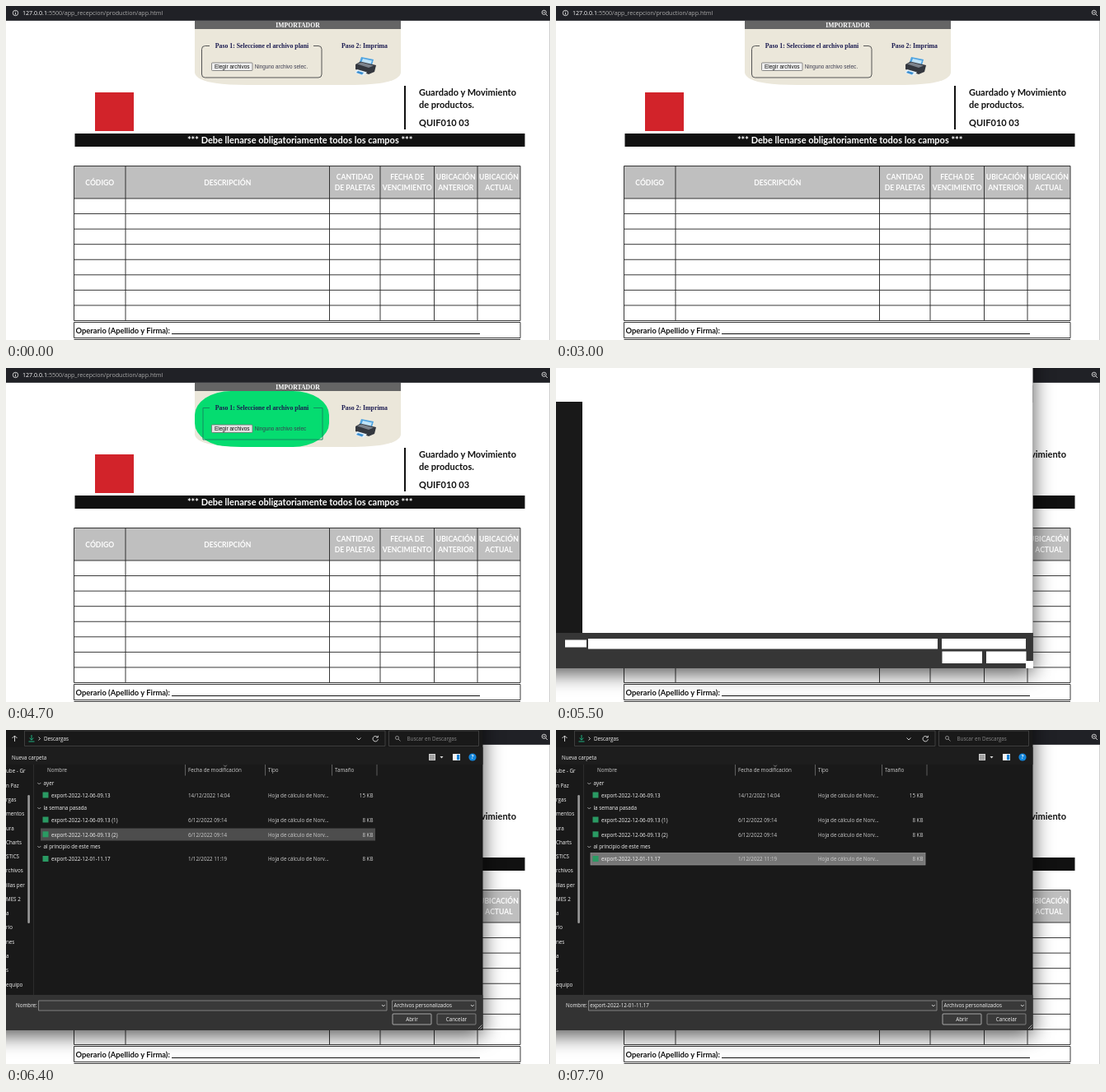
An HTML page for the animation above (8 s loop, 660 by 406 pixels).

```html
<!DOCTYPE html>
<html lang="es">
<head>
<meta charset="utf-8">
<title>Importador</title>
<style>
html, body { margin: 0; width: 100%; height: 100%; overflow: hidden; background: #fff; }
svg { display: block; width: 660px; height: 406px; }
text { white-space: pre; }
.form { font: 700 11px Lato, Carlito, sans-serif; fill: #111; }
.head { font-size: 8.6px; fill: #fff; text-anchor: middle; }
.serif { font: 700 7.8px "Liberation Serif", serif; fill: #1b1b50; text-anchor: middle; }
.ctrl { font: 6.5px "Liberation Sans", sans-serif; fill: #111; }
.status { font-size: 6.35px; fill: #3c3c50; }
.ui { font: 6.25px "Open Sans", "Noto Sans", sans-serif; fill: #f4f4f4; }
.dim { fill: #cdcdcd; }
.end { text-anchor: end; }
.mid { text-anchor: middle; }
.line { fill: none; stroke: #e0e0e0; stroke-width: .9; }
.window { filter: drop-shadow(0 6px 12px rgba(0, 0, 0, .68)); }

/* 1.25% of the loop is 100 ms */
.a { animation: 8s step-end infinite; }
.green { animation-name: green; }
.plain { animation-name: plain; }
.button { animation-name: button; }
.dialog { animation-name: dialog; }
.blank { animation-name: blank; }
.busy { animation-name: busy; }
.files { animation-name: files; }
.side { animation-name: side; }
.thumb { animation-name: thumb; }
.hover { animation-name: hover; }
.caret { animation-name: caret; }
.chosen { animation-name: chosen; }
@keyframes green {
  0% { opacity: 0; }
  41.25% { opacity: 0; animation-timing-function: steps(6, start); }
  48.75%, 100% { opacity: 1; }
}
@keyframes plain {
  0% { opacity: 1; }
  41.25% { opacity: 1; animation-timing-function: steps(6, start); }
  48.75%, 100% { opacity: 0; }
}
@keyframes button { 0% { fill: #efefef; } 56.25%, 100% { fill: #e2e2e2; } }
@keyframes dialog { 0% { opacity: 0; } 68.75%, 100% { opacity: 1; } }
@keyframes blank { 0% { opacity: 1; } 70%, 100% { opacity: 0; } }
@keyframes busy { 0% { opacity: 1; } 72.5%, 100% { opacity: 0; } }
@keyframes files { 0% { opacity: 0; } 72.5%, 100% { opacity: 1; } }
@keyframes side { 0% { transform: none; } 72.5%, 100% { transform: translateY(-51.8px); } }
@keyframes thumb { 0% { y: 50px; height: 191px; } 72.5%, 100% { y: 79px; height: 156px; } }
@keyframes hover {
  0% { opacity: 0; x: 42px; y: 72px; width: 406px; height: 15px; fill: #4d4d4d; stroke: none; }
  77.5% { opacity: 1; x: 42px; y: 72px; width: 406px; height: 15px; fill: #4d4d4d; stroke: none; }
  78.75% { opacity: 1; x: 42px; y: 102px; width: 406px; height: 15px; fill: #4d4d4d; stroke: none; }
  80% { opacity: 1; x: 42px; y: 119.5px; width: 406px; height: 15px; fill: #4d4d4d; stroke: none; }
  81.25% { opacity: 1; x: 35px; y: 136px; width: 543px; height: 12px; fill: #4d4d4d; stroke: none; }
  83.75% { opacity: 1; x: 42px; y: 149.5px; width: 406px; height: 14.5px; fill: #4d4d4d; stroke: none; }
  91.25%, 100% { opacity: 1; x: 42px; y: 149.5px; width: 406px; height: 14.5px; fill: #767676; stroke: #999; }
}
@keyframes caret {
  0% { opacity: 1; }
  77.5% { opacity: 0; }
  83.75% { opacity: 1; }
  91.25%, 100% { opacity: 0; }
}
@keyframes chosen { 0% { opacity: 0; } 96.25%, 100% { opacity: 1; } }
</style>
</head>
<body>
<svg viewBox="0 0 660 406">
  <defs>
    <clipPath id="panel"><path d="M229 28H479V81Q477 96 415 96H293Q231 96 229 81Z"/></clipPath>
    <clipPath id="sideBox"><path d="M0 43H23.5V321H0Z"/></clipPath>
  </defs>

  <!-- browser bar -->
  <path d="M0 0H660V18H0Z" fill="#202126"/>
  <path d="M0 17.5H660" stroke="#3a3b40"/>
  <circle cx="11.5" cy="8.5" r="3.2" class="line"/>
  <path d="M11.5 8V10.5M11.5 6.4V7.2" class="line"/>
  <text x="20" y="11" class="ui" style="font-size:7.1px;fill:#aaa"><tspan fill="#fff">127.0.0.1</tspan>:5500/app_recepcion/production/app.html</text>
  <g class="line"><circle cx="652.8" cy="7.8" r="2.6"/><path d="M654.8 9.8L657 12M651.6 7.8H654"/></g>
  <path d="M659.5 18V406" stroke="#d0d0d0"/>

  <!-- import panel -->
  <path d="M229 18H479V28H229Z" fill="#656565"/>
  <text x="354" y="25.7" class="serif" style="fill:#fff;font-size:7.7px">IMPORTADOR</text>
  <g clip-path="url(#panel)">
    <path d="M229 28H479V96H229Z" fill="#ebe7da"/>
    <rect x="229" y="28" width="163" height="68" rx="44" ry="29" fill="#05dc70" class="a green"/>
  </g>
  <path d="M247 48.5H241.5Q237.5 48.5 237.5 52.5V83Q237.5 87 241.5 87H379Q383 87 383 83V52.5Q383 48.5 379 48.5H373" fill="none" stroke="#555" class="a plain"/>
  <path d="M247 48.5H239V87H384V48.5H373" fill="none" stroke="#148a60" class="a green"/>
  <text x="310.5" y="51.3" class="serif">Paso 1: Seleccione el archivo plani</text>
  <text x="435" y="51.3" class="serif">Paso 2: Imprima</text>
  <rect x="249.5" y="69" width="49.5" height="9.5" rx="1" fill="#efefef" stroke="#707070" stroke-width=".8" class="a button"/>
  <text x="274.3" y="76.2" class="ctrl mid">Elegir archivos</text>
  <text x="301.7" y="76.2" class="ctrl status">Ninguno archivo selec</text>
  <text x="364.5" y="76.2" class="ctrl status a plain">.</text>
  <g>
    <path d="M431 62L446 65L443 75L428 71Z" fill="#4fa3e0"/>
    <path d="M433 64L444 66.5L442 72L431 69Z" fill="#bfe3f8"/>
    <path d="M424 71L430 67.5L449 72L447 80L440 83L424 77Z" fill="#34383f"/>
    <path d="M426 70.5L431 68.5L446 72.5L440 75Z" fill="#7c838c"/>
    <path d="M426 77L438 80.5L434 85L423 81Z" fill="#e4eff7"/>
    <path d="M427 79L434 81L432 83.5L425 81Z" fill="#3b8fd0"/>
  </g>

  <!-- form -->
  <rect x="108" y="105" width="47" height="47" fill="#d2232a"/>
  <path d="M484 97V150" stroke="#111" stroke-width="2"/>
  <g class="form">
    <text x="501" y="109">Guardado y Movimiento</text>
    <text x="501" y="124.3">de productos.</text>
    <text x="501" y="146">QUIF010 03</text>
    <path d="M83.5 155H629.5V171H83.5Z"/>
    <text x="356.7" y="167.2" class="mid" style="fill:#fff">*** Debe llenarse obligatoriamente todos los campos ***</text>
    <path d="M82.5 194.5H624V234H82.5Z" style="fill:#bfbfbf"/>
    <path id="grid" fill="none" stroke="#222" stroke-width=".9"/>
    <g id="heads"></g>
    <text x="84.5" y="397.5" style="font-size:9.4px">Operario (Apellido y Firma):</text>
    <path d="M201 398.5H575" stroke="#111"/>
  </g>

  <!-- file dialog -->
  <g class="a dialog">
    <path d="M-60 -60H578.5V365H-60Z" fill="#191919" class="window"/>
    <path d="M0 21H578.5V42H0Z" fill="#1d1d1d"/>
    <path d="M0 322H578.5V365H0Z" fill="#333"/>
    <path d="M33.5 42V322" stroke="#2b2b2b"/>
    <g fill="none" stroke="#484848" stroke-width=".8">
      <path d="M22.5 1H460V19.5H22.5ZM464.5 1H573.5V19.5H464.5Z"/>
      <path d="M217.5 42V55.5M314.5 42V55.5M395.5 42V55.5M450 42V55.5" stroke="#707070"/>
    </g>
    <g class="line">
      <path d="M10.5 14V7M7.5 10L10.5 7L13.5 10M39.5 8.5L41.5 10.5L39.5 12.5M425.5 9.5L428 12L430.5 9.5"/>
      <path d="M450.7 8.7A3.2 3.2 0 1 0 451.4 11.2M451.3 6.8V9H449"/>
      <path d="M264.2 42.7L266 44.5L267.8 42.7" style="stroke:#999"/>
      <path d="M31 6V12M28.5 9.8L31 12.2L33.5 9.8M27.5 14H34.5" style="stroke:#21c08b"/>
      <g style="stroke:#999"><circle cx="474.5" cy="9.5" r="2"/><path d="M476 11L478.5 13.5"/></g>
    </g>
    <g class="ui">
      <text x="46" y="12.5">Descargas</text>
      <text x="486.5" y="12.7" style="fill:#888">Buscar en Descargas</text>
      <text x="7" y="35.5">Nueva carpeta</text>
      <g class="dim">
        <text x="50" y="51">Nombre</text>
        <text x="221" y="51">Fecha de modificación</text>
        <text x="318" y="51">Tipo</text>
        <text x="399" y="51">Tamaño</text>
      </g>
    </g>
    <path d="M513 29H521V37H513Z" fill="#ccc"/>
    <path d="M514 31.2H520M514 33.2H520M514 35.2H520" stroke="#555" stroke-width=".7"/>
    <path d="M526.5 32H530.5L528.5 34.5Z" fill="#ddd"/>
    <path d="M542 29H551V37H542Z" fill="#f2f2f2"/>
    <path d="M547 30H550.3V36.3H547Z" fill="#1683d8"/>
    <circle cx="566" cy="33" r="4.6" fill="#1185dc"/>
    <text x="566" y="35.4" class="ui mid" style="font-weight:700">?</text>

    <g clip-path="url(#sideBox)"><g id="side" class="ui a side"><path d="M0 59.5H22.5V76H0Z" fill="#3a3a3a"/></g></g>
    <rect x="26.3" y="50" width="2.6" height="191" rx="1.3" fill="#9a9a9a" class="a thumb"/>

    <text x="306" y="70.5" class="ui mid a busy">Estamos trabajando en ello...</text>
    <g class="a files">
      <rect stroke-width=".7" class="a hover"/>
      <g id="files" class="ui"></g>
    </g>

    <g fill="#393939" stroke="#949494" stroke-width=".8">
      <path d="M39.5 329H462V341H39.5ZM468.5 329H570V341H468.5Z"/>
      <rect x="469" y="345" width="47" height="13" rx="1" stroke="#c4c4c4"/>
      <rect x="523" y="345" width="47" height="13" rx="1"/>
    </g>
    <path d="M456 334L457.8 336L459.6 334M564 334L565.8 336L567.6 334" class="line"/>
    <path d="M41.5 330.5V339.5" stroke="#ddd" stroke-width=".7" class="a caret"/>
    <g class="ui">
      <text x="12" y="337.2">Nombre:</text>
      <text x="470.5" y="337.2">Archivos personalizados</text>
      <text x="492.5" y="353.7" class="mid">Abrir</text>
      <text x="546.5" y="353.7" class="mid">Cancelar</text>
      <text x="41.3" y="337.2" class="a chosen">export-2022-12-01-11.17</text>
    </g>
    <path d="M573 363L577.5 358.5M575.5 363.5L577.5 361.5" stroke="#aaa"/>

    <!-- unpainted first moment -->
    <g class="a blank">
      <path d="M0 0H578.5V322H0Z" fill="#fff"/>
      <path d="M0 41H32V322H0Z" fill="#191919"/>
      <path d="M0 322H578.5V365H0Z" fill="#363636"/>
      <path d="M11 330.5H37V339.5H11ZM39 329H463V341.5H39ZM468 329H570V341.5H468ZM468.5 344.5H517V359H468.5ZM522 344.5H570.5V359H522ZM570 356H579V365H570Z" fill="#fff"/>
    </g>
  </g>
</svg>
<script>
const $ = id => document.getElementById(id);
const add = (id, markup) => $(id).insertAdjacentHTML('beforeend', markup);
const text = (x, y, str, cls = '') => `<text x="${x}" y="${y}" class="${cls}">${str}</text>`;

// table grid
const cols = [82.5, 145, 392.5, 454, 519.5, 572, 624];
let d = 'M82.5 194.5H624M82.5 384.5H624V403.5H82.5ZM82.5 405.5H624';
for (const x of cols) d += `M${x} 194.5V382.5`;
for (let i = 0; i < 9; i++) d += `M82.5 ${234 + i * 18.56}H624`;
$('grid').setAttribute('d', d);

const heads = ['CÓDIGO', 'DESCRIPCIÓN', 'CANTIDAD/DE PALETAS', 'FECHA DE/VENCIMIENTO', 'UBICACIÓN/ANTERIOR', 'UBICACIÓN/ACTUAL'];
heads.forEach((label, i) => {
  const x = (cols[i] + cols[i + 1]) / 2, lines = label.split('/');
  lines.forEach((s, k) => add('heads', text(x, lines.length > 1 ? 211.3 + k * 12.8 : 217.5, s, 'head')));
});

// folder list, cut off by the left edge of the stage
['o', 'rgas', '', 'ube - Gru', 'n Paz', 'rgas', 'mentos', 'ura', 'Charts', 'STICS', 'rchivos', 'illas per',
 'MES 2', 'a', 'rio', 'nes', 'a', 's', 'equipo'].forEach((s, i) => add('side', text(0, 52.5 + i * 17.27, s)));

const groups = [[65, 'ayer'], [95, 'la semana pasada'], [142, 'al principio de este mes']];
for (const [y, s] of groups)
  add('files', `<path d="M38.3 ${y - 1}l2 2l2 -2" class="line" style="stroke:#aaa"/>` + text(45.5, y + 2, s));

const rows = [
  [79.5, '2022-12-06-09.13', '14/12/2022 14:04', 15],
  [109.5, '2022-12-06-09.13 (1)', '6/12/2022 09:14', 8],
  [127.3, '2022-12-06-09.13 (2)', '6/12/2022 09:14', 8],
  [157, '2022-12-01-11.17', '1/12/2022 11:19', 8]
];
for (const [y, name, date, size] of rows)
  add('files', `<rect x="44.5" y="${y - 4}" width="7" height="7" fill="#2a9a63"/>`
    + text(55, y + 2.3, 'export-' + name) + text(221, y + 2.3, date, 'dim')
    + text(318, y + 2.3, 'Hoja de cálculo de Norv...', 'dim') + text(445.5, y + 2.3, size + ' KB', 'dim end'));
</script>
</body>
</html>
```
